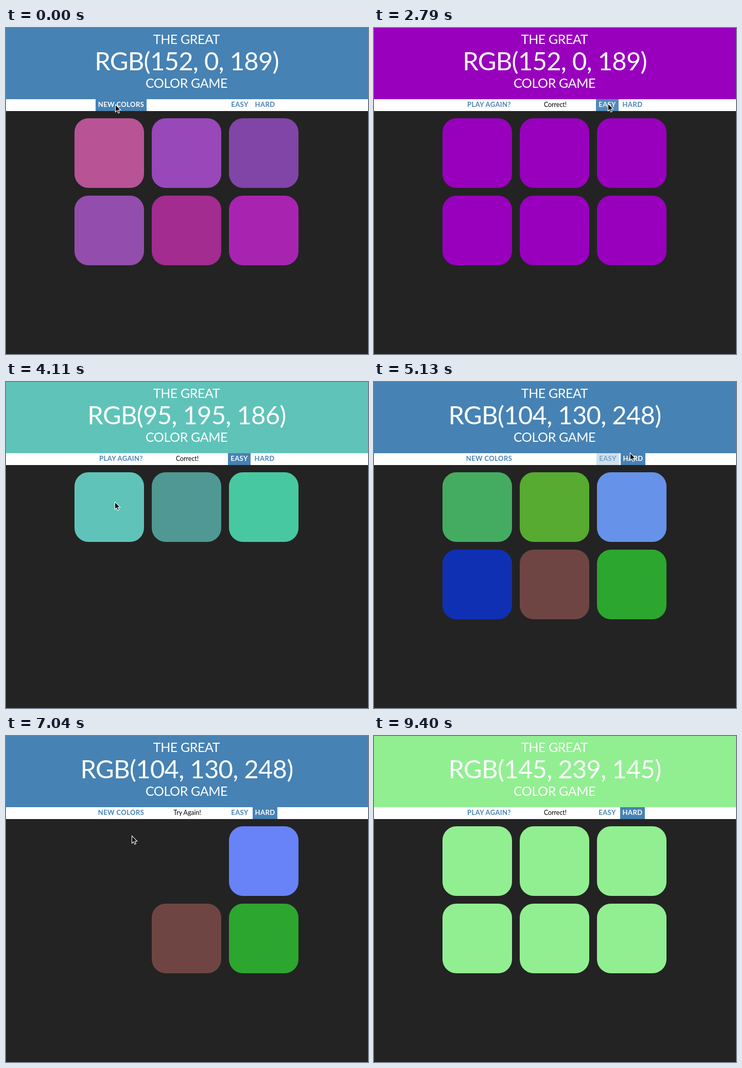
Recreate the animation shown at these times as an HTML page. Size 703x632 px, loop 9550 ms.

```html
<!DOCTYPE html>
<html lang="en">
<head>
<meta charset="utf-8">
<title>Color Game</title>
<style>
  html, body { margin: 0; width: 100%; height: 100%; overflow: hidden; background: #232323; }
  svg { display: block; width: 703px; height: 632px; font-family: Lato, "Open Sans", sans-serif; text-anchor: middle; }
  .title text { fill: #fff; font-size: 25px; letter-spacing: -.016em; }
  .title .big { font-size: 49px; }
  .btn text { font-size: 13px; font-weight: 700; letter-spacing: .4px; }
  .msg { font-size: 12.4px; }
</style>
</head>
<body>
<svg viewBox="0 0 703 632">
  <rect width="703" height="632" fill="#232323"/>
  <rect id="header" width="703" height="138"/>
  <g class="title">
    <text x="350.5" y="31">THE GREAT</text>
    <text x="351" y="82" class="big" id="goal"></text>
    <text x="350.5" y="116">COLOR GAME</text>
  </g>
  <rect y="138" width="703" height="23" fill="#fff"/>
  <g id="buttons"></g>
  <text class="msg" id="msg" x="352" y="153"></text>
  <g id="tiles"></g>
  <path id="cursor" d="M.5 .5V15L3.8 11.9L6 17L8.4 16L6.2 11H10.8Z" fill="#000" stroke="#fff" stroke-width="1.1"/>
</svg>
<script>
const LOOP = 9550, STEPS = 65, FADE = 600, HOVER = 450;

const hex = s => [0, 2, 4].map(i => parseInt(s.slice(i, i + 2), 16));
const rgb = c => `rgb(${c.map(Math.round)})`;
const clamp = x => Math.min(1, Math.max(0, x));
const mix = (a, b, k) => a.map((v, i) => v + (b[i] - v) * k);
const $ = id => document.getElementById(id);

const BG = hex("232323"), BLUE = hex("4682b4"), WHITE = hex("ffffff"), START = hex("ad30ab");

// Seeded random color
const shade = seed => [1, 2, 3].map(c => {
  const v = Math.sin(seed * 12.9898 + c * 78.233) * 43758.5453;
  return Math.floor((v - Math.floor(v)) * 256);
});

const deal = (colors, answer) => ({ colors, goal: colors[answer] });
const palette = list => list.split(" ").map(hex);
const rounds = [
  deal(palette("d6b95a 5a8ee0 047f9b 48a3b4 811f43 9800bd"), 5),
  deal(palette("5fc3ba 4a8683 3eca95"), 0),
  deal(palette("3ba443 53a302 6882f8 1030b4 6e4542 2ca62e"), 2),
  deal([1, 2, 3, 4, 5].map(shade).concat([hex("91ef91")]), 5)
];

// The player's moves: time, place, and the button or tile clicked there, if any
const moves = [
  [-110, 212, 148, "new"], [440, 200, 238, 0], [850, 346, 369, 4], [1620, 484, 397, 5],
  [2830, 454, 146, "easy"], [3995, 211, 232, 0],
  [4870, 497, 137, "hard"], [5130, 497, 137], [5300, 350, 240, 1], [5870, 311, 318],
  [6050, 205, 385, 3], [6420, 205, 262, 0], [7040, 244, 193],
  [7600, 220, 148, "new"], [8650, 500, 397, 5], [9260, 694, 608], [9390, 720, 650]
];

// CSS "ease": cubic-bezier(.25, .1, .25, 1)
function ease(x) {
  if (x <= 0 || x >= 1) return clamp(x);
  let lo = 0, hi = 1, s;
  for (let i = 0; i < 20; i++) {
    s = (lo + hi) / 2;
    if (.75 * s * (1 - s) + s ** 3 < x) lo = s; else hi = s;
  }
  return .3 * s * (1 - s) ** 2 + 3 * s * s * (1 - s) + s ** 3;
}

// Events are { t, to, dur }
const fade = (start, events, t) => events.reduce((v, e) =>
  t < e.t ? v : mix(v, e.to, e.dur ? ease((t - e.t) / e.dur) : 1), start);

function add(parent, tag, attrs) {
  const el = document.createElementNS("http://www.w3.org/2000/svg", tag);
  for (const key in attrs) el.setAttribute(key, attrs[key]);
  return parent.appendChild(el);
}

const tiles = Array.from({ length: 6 }, (_, i) => ({
  events: [],
  el: add($("tiles"), "rect", {
    x: 133 + i % 3 * 150, y: 175 + Math.floor(i / 3) * 150, width: 135, height: 135, rx: 27
  })
}));

function makeButton(x, width, label) {
  const g = add($("buttons"), "g", { class: "btn" });
  const box = add(g, "rect", { y: 138, width, height: 23 });
  const text = add(g, "text", { x: width / 2, y: 153 });
  text.textContent = label;
  return { x, g, box, text, events: [] };
}
const buttons = {
  new: makeButton(174, 99, "NEW COLORS"),
  easy: makeButton(432, 44, "EASY"),
  hard: makeButton(479, 48, "HARD")
};

// Play the game once, noting what each click changes
const states = [];
const paint = (tile, t, to, dur = FADE) => tile.events.push({ t, to, dur });
const light = (name, t, level) => buttons[name].events.push({ t, to: [level], dur: FADE });

function press(name, t, round, shown) {
  const count = round.colors.length;
  tiles.forEach((tile, i) =>
    paint(tile, t, round.colors[i] || BG, i < Math.min(count, shown) ? FADE : 0));
  light(name, t - HOVER, 1);
  if (name === "new") light(name, t + 200, 0);
  if (name === "hard") light("easy", t, 0);
  states.push({ t, goal: round.goal, header: BLUE, msg: "" });
}

function guess(i, t, { colors, goal }) {
  const won = colors[i] === goal;
  if (won) colors.forEach((_, n) => paint(tiles[n], t, goal));
  else paint(tiles[i], t, BG);
  states.push({ t, goal, header: won ? goal : BLUE, msg: won ? "Correct!" : "Try Again!", won });
}

let turn = -1;
for (const [t, , , on] of moves) {
  if (on in buttons) {
    const shown = turn < 0 ? 6 : rounds[turn].colors.length;
    press(on, t, rounds[++turn], shown);
  } else if (on !== undefined) guess(on, t, rounds[turn]);
}

// Rest around each stop and glide between them
function cursorAt(t) {
  const next = moves.findIndex(m => m[0] > t);
  const [t1, ...b] = moves.at(next);
  if (next < 0) return b;
  const [t0, ...a] = moves[next - 1];
  const k = clamp(((t - t0) / (t1 - t0) - .2) / .6);
  return mix(a.slice(0, 2), b, k * k * (3 - 2 * k)).map(Math.round);
}

function render(t) {
  const { goal, header, msg, won } = states.findLast(s => s.t <= t);
  $("header").setAttribute("fill", rgb(header));
  $("goal").textContent = `RGB(${goal.join(", ")})`;
  $("msg").textContent = msg;
  buttons.new.text.textContent = won ? "PLAY AGAIN?" : "NEW COLORS";

  for (const b of Object.values(buttons)) {
    const [level] = fade([0], b.events, t);
    const shift = won && b !== buttons.new ? 1 : 0;
    b.g.setAttribute("transform", `translate(${b.x - shift} 0)`);
    b.box.setAttribute("fill", rgb(mix(WHITE, BLUE, level)));
    b.text.setAttribute("fill", rgb(mix(BLUE, WHITE, level)));
  }
  for (const { el, events } of tiles) el.setAttribute("fill", rgb(fade(START, events, t)));
  const [x, y] = cursorAt(t);
  $("cursor").setAttribute("transform", `translate(${x} ${y})`);
}

// The screen refreshes in even steps, each up to 14 ms early
function tick() {
  const step = LOOP / STEPS;
  render(Math.floor((performance.now() % LOOP + 14) / step) % STEPS * step);
  requestAnimationFrame(tick);
}
tick();
</script>
</body>
</html>
```
